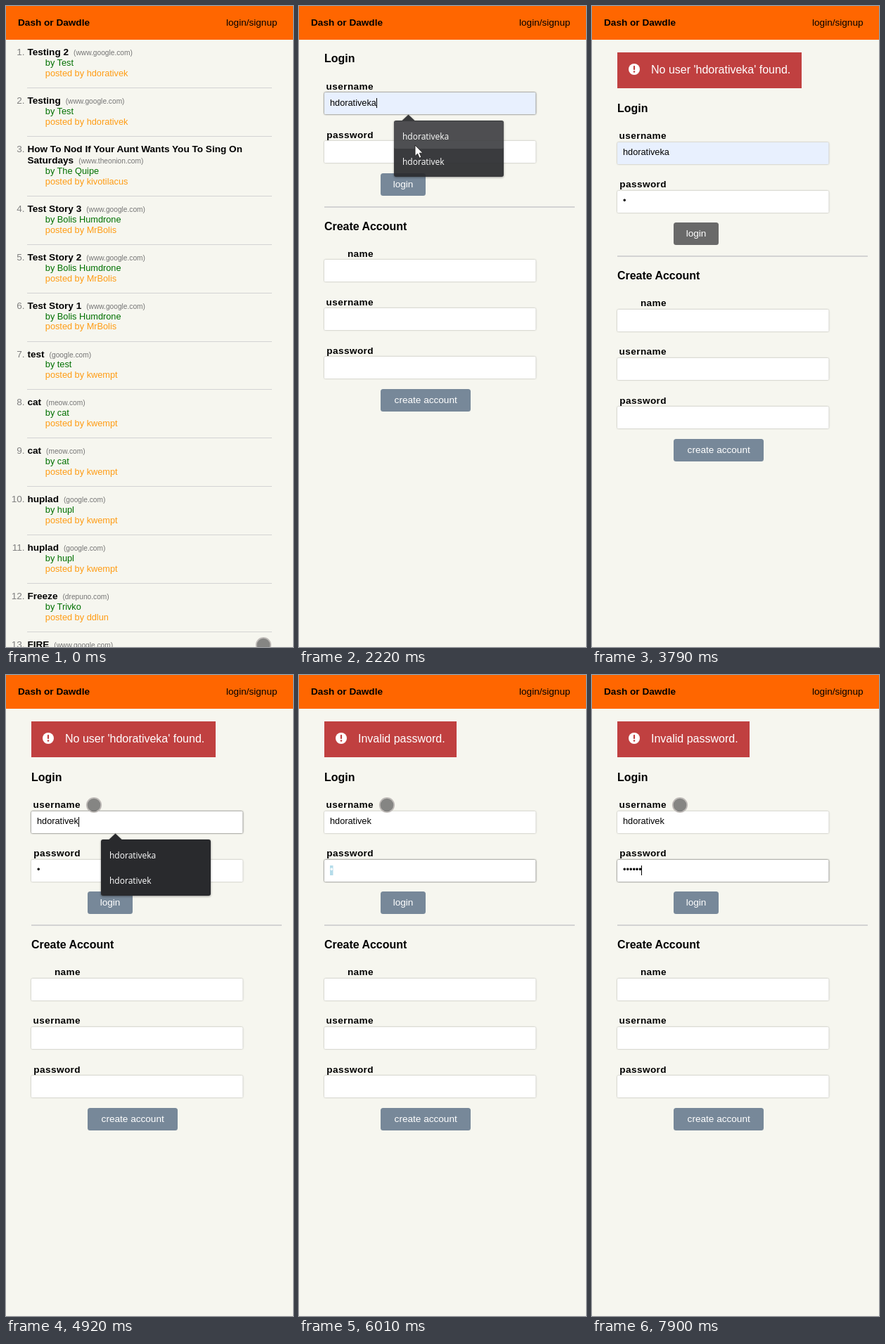
Animation, 408 px wide and 912 px high, one loop 8 s. Source, as an HTML page:

```html
<!DOCTYPE html>
<html lang="en">
<head>
<meta charset="utf-8">
<title>Dash or Dawdle</title>
<style>
html, body { margin: 0; width: 100%; height: 100%; overflow: hidden; background: #f6f6ef; }
svg { display: block; width: 408px; height: 912px; font: 13.6px "Liberation Sans", Arial, sans-serif; }
.b { font-weight: bold; }
.num { fill: #808080; text-anchor: end; }
.host { font-size: 10.2px; font-weight: normal; fill: #757575; }
.small { font-size: 12.75px; }
.by { fill: #007000; }
.poster { fill: #ff9c14; }
.rule { fill: #d3d3d3; }
.h3 { font-size: 15.95px; font-weight: bold; }
.label { font-weight: bold; letter-spacing: .4px; text-anchor: end; }
.field { fill: #fff; filter: drop-shadow(0 0 1.3px rgba(0,0,0,.32)); }
.field.focus { filter: drop-shadow(0 0 1px rgba(0,0,0,.8)); }
.field.auto { fill: #e8f0fe; }
.btn { fill: #778899; }
.btn.hover { fill: #696969; }
.white { fill: #fff; }
.msg { font-size: 16px; fill: #fff; }
.menu { filter: drop-shadow(0 1px 1.5px rgba(0,0,0,.4)); }
.menu text { font: 12px "Open Sans", sans-serif; fill: #fff; }
</style>
</head>
<body>
<svg id="stage" viewBox="0 0 408 912"></svg>
<script>
const NS = 'http://www.w3.org/2000/svg';
const LOOP = 8000;
const USER = 'hdorativek';

function el(parent, tag, attrs = {}, content) {
  const node = document.createElementNS(NS, tag);
  for (const k in attrs) node.setAttribute(k, attrs[k]);
  if (content !== undefined) node.textContent = content;
  return parent.appendChild(node);
}
// Text and boxes sit on whole pixel rows; baseY keeps the exact place.
const text = (p, x, y, str, cls = '') => {
  const node = el(p, 'text', { x, y: Math.round(y), class: cls }, str);
  node.baseY = y;
  return node;
};
const rect = (p, x, y, width, height, cls = '', rx = 0) => {
  const node = el(p, 'rect', { x, y: Math.round(y), width, height, class: cls, rx });
  node.baseY = y;
  return node;
};
const show = (node, on) => { node.style.display = on ? '' : 'none'; };
const move = (node, x, y) => node.setAttribute('transform', `translate(${x} ${y})`);
const within = (t, a, b) => t >= a && t < b;
const clamp = v => Math.min(1, Math.max(0, v));
const swing = v => 0.5 - Math.cos(Math.PI * clamp(v)) / 2;

const stage = document.getElementById('stage');
rect(stage, 0, 0, 408, 912).setAttribute('fill', '#f6f6ef');

// Story list
const list = el(stage, 'g');
const google = 'www.google.com';
const stories = [
  ['Testing 2', google, 'Test', USER],
  ['Testing', google, 'Test', USER],
  ['How To Nod If Your Aunt Wants You To Sing On|Saturdays', 'www.theonion.com', 'The Quipe', 'kivotilacus'],
  ['Test Story 3', google, 'Bolis Humdrone', 'MrBolis'],
  ['Test Story 2', google, 'Bolis Humdrone', 'MrBolis'],
  ['Test Story 1', google, 'Bolis Humdrone', 'MrBolis'],
  ['test', 'google.com', 'test', 'kwempt'],
  ['cat', 'meow.com', 'cat', 'kwempt'],
  ['cat', 'meow.com', 'cat', 'kwempt'],
  ['huplad', 'google.com', 'hupl', 'kwempt'],
  ['huplad', 'google.com', 'hupl', 'kwempt'],
  ['Freeze', 'drepuno.com', 'Trivko', 'ddlun'],
  ['FIRE', google, 'Trivko', 'ddlun']
];
let rowY = 0;
stories.forEach(([title, host, author, poster], i) => {
  text(list, 26.6, rowY + 70.3, `${i + 1}.`, 'num');
  let line;
  title.split('|').forEach((part, k) => {
    if (k) rowY += 16.15;
    line = text(list, 30.4, rowY + 70.3, part, 'b');
  });
  el(line, 'tspan', { dx: 7, class: 'host' }, `(${host})`);
  text(list, 55.8, rowY + 85.2, `by ${author}`, 'small by');
  text(list, 55.8, rowY + 100, `posted by ${poster}`, 'small poster');
  rect(list, 30, rowY + 116.2, 348, 1, 'rule');
  rowY += 68.85;
});

// Login page
const page = el(stage, 'g');
const alertBox = el(page, 'g');
const alertClip = el(el(page, 'clipPath', { id: 'alertClip' }), 'rect', { x: 36, width: 300 });
const alertBg = rect(alertBox, 36, 0, 262, 51);
alertBg.setAttribute('fill', '#c04040');
const alertBody = el(el(alertBox, 'g', { 'clip-path': 'url(#alertClip)' }), 'g');
el(alertBody, 'circle', { cx: 60, cy: -5, r: 8, fill: '#fff' });
rect(alertBody, 58.9, -10, 2.2, 6, '', 0.8).setAttribute('fill', '#c04040');
el(alertBody, 'circle', { cx: 60, cy: -1.5, r: 1.3, fill: '#c04040' });
const alertText = text(alertBody, 84, 1, '', 'msg');

const form = el(page, 'g');
const field = (label, y) => {
  text(form, 106, y - 4.4, label, 'label');
  return rect(form, 36, y, 300.5, 31, 'field', 1.5);
};
const button = (label, x, y, w, tx) => {
  const b = rect(form, x, y, w, 32, 'btn', 3.5);
  text(form, tx, y + 20, label, 'white');
  return b;
};
text(form, 36, 80, 'Login', 'h3');
const userField = field('username', 123.1);
const passField = field('password', 192.2);
const loginBtn = button('login', 116, 237.8, 64, 133.7);
rect(form, 36, 284.8, 356, 2, 'rule');
text(form, 36, 318.8, 'Create Account', 'h3');
['name', 'username', 'password'].forEach((label, i) => field(label, 361.2 + i * 69.1));
button('create account', 116, 545.1, 128, 135.6);
const selection = rect(form, 44, 200, 4.5, 14);
selection.setAttribute('fill', '#b5dcea');
const userText = text(form, 44, 141.9, '', 'small');
const passText = text(form, 44, 210.9, '', 'small');
const caret = rect(form, 0, 0, 1, 14);

// Suggestion menu
const menu = el(page, 'g', { class: 'menu' });
el(menu, 'path', { d: 'M146 163.5L155.500 154.500L165 163.5Z', fill: '#292a2d' });
rect(menu, 135, 163, 156, 80, '', 3).setAttribute('fill', '#292a2d');
const menuHover = rect(menu, 135, 164, 156, 39, '', 2);
menuHover.setAttribute('fill', '#3f4043');
text(menu, 147, 190, USER + 'a');
text(menu, 147, 226, USER);

// Header
rect(stage, 0, 0, 408, 48).setAttribute('fill', '#ff6600');
text(stage, 17, 28, 'Dash or Dawdle', 'b');
text(stage, 313, 28, 'login/signup');

// Pointers
const dot = el(stage, 'circle', {
  r: 10.2, fill: 'rgba(85,85,85,.7)', stroke: '#bfbbb8', 'stroke-width': 1.8
});
const arrow = el(stage, 'path', {
  d: 'M0 0V15.5L3.600 12.200L6.200 18.300L8.900 17.100L6.300 11.200H11Z',
  fill: '#fff', stroke: '#222', 'stroke-width': 0.9
});
const fourWay = 'M0 -8L3 -4.500H1V-1H4.500V-3L8 0L4.500 3V1H1V4.500H3L0 8L-3 4.500H-1V1H-4.500V3L-8 0L-4.500 -3V-1H-1V-4.500H-3Z';
const mover = el(stage, 'path', {
  d: fourWay, fill: '#000', stroke: '#fff', 'stroke-width': 1, 'paint-order': 'stroke'
});
move(mover, 125, 185);

// Pointer path: time, x, y
const path = [
  [0, 366, 909], [30, 366, 909], [60, 393, 436], [200, 393, 436], [400, 396, 230],
  [620, 356, 22], [760, 349, 26], [1070, 349, 27], [1350, 250, 80], [1620, 152, 141],
  [2010, 152, 141], [2150, 165, 198], [2300, 165, 198], [2480, 154, 205], [2660, 154, 205],
  [2800, 149, 256], [3180, 149, 256], [3280, 149, 227], [3420, 142, 200],
  [4020, 130, 230], [4180, 125, 206], [4300, 125, 185], [LOOP, 125, 185]
];
function pointAt(t) {
  const i = path.findIndex(p => p[0] > t);
  const [a, b] = [path[i - 1], path[i]];
  const k = (t - a[0]) / (b[0] - a[0]);
  return [a[1] + (b[1] - a[1]) * k, a[2] + (b[2] - a[2]) * k];
}

const SHIFT = 70.5;
const keyTimes = [6770, 7100, 7300, 7610, 7770, 7900];

function drawAlert(t) {
  const retry = t >= 5420;
  const p = swing((t - (retry ? 5475 : 3370)) / 400);
  const y = 57.5 + 8.5 * p;
  show(alertBox, p > 0);
  for (const box of [alertBg, alertClip]) {
    box.setAttribute('y', Math.round(y));
    box.setAttribute('height', Math.round(51 * p));
  }
  alertBg.setAttribute('width', retry ? 188 : 262);
  alertText.textContent = retry ? 'Invalid password.' : `No user '${USER}a' found.`;
  move(alertBody, 0, Math.round(y + 16 * p + 13));
  for (const node of form.children) {
    node.setAttribute('y', Math.round(node.baseY + SHIFT * p));
  }
}

function drawForm(t) {
  const userFocus = within(t, 1680, 2580) || within(t, 4190, 5920);
  const passFocus = within(t, 2580, 3170) || t >= 5920;
  userField.classList.toggle('focus', userFocus);
  userField.classList.toggle('auto', within(t, 2110, 4890));
  passField.classList.toggle('focus', passFocus);
  loginBtn.classList.toggle('hover', within(t, 3120, 4190));

  const name = t < 2110 ? '' : t < 4890 ? USER + 'a' : USER;
  const typed = keyTimes.filter(k => t >= k);
  const dots = t < 2860 ? 0 : Math.max(1, typed.length);
  userText.textContent = name;
  passText.textContent = '•'.repeat(dots);
  const selected = within(t, 5920, 6770);
  show(selection, selected);
  passText.setAttribute('fill', selected ? '#fff' : '#000');

  const resets = [1700, 2110, 2580, 2860, 4190, 4890, ...keyTimes];
  const last = resets.filter(k => k <= t).pop();
  show(caret, (userFocus || passFocus) && !selected && (t - last) % 1000 < 500);
  const nameW = name.length > 10 ? 66 : name ? 59 : 0;
  caret.setAttribute('x', passFocus ? Math.round(44 + dots * 4.46 - 0.8) : 44 + nameW);
  caret.baseY = passFocus ? 200 : 131;
}

function drawMenu(t) {
  const second = t > 4000;
  const fade = second ? 1 - (t - 5690) / 150 : 1 - (t - 2205) / 195;
  show(menu, within(t, 1720, 2400) || within(t, 4905, 5840));
  menu.style.opacity = clamp(fade);
  show(menuHover, within(t, 2110, 2400));
  move(menu, 0, second ? 71 : 0);
}

function drawPointer(t) {
  const [x, y] = pointAt(t);
  const overMenu = within(t, 2060, 2330);
  const moving = within(t, 6600, 7430);
  show(arrow, overMenu);
  show(mover, moving);
  show(dot, !overMenu && !moving && !within(t, 3640, 4020));
  move(arrow, x, y);
  move(dot, x, y);
}

function draw(t) {
  const onLogin = t >= 860;
  show(list, !onLogin);
  show(page, onLogin);
  drawForm(t);
  drawAlert(t);
  drawMenu(t);
  drawPointer(t);
}

const start = performance.now();
function tick() {
  draw((performance.now() - start) % LOOP);
  requestAnimationFrame(tick);
}
tick();
</script>
</body>
</html>
```
